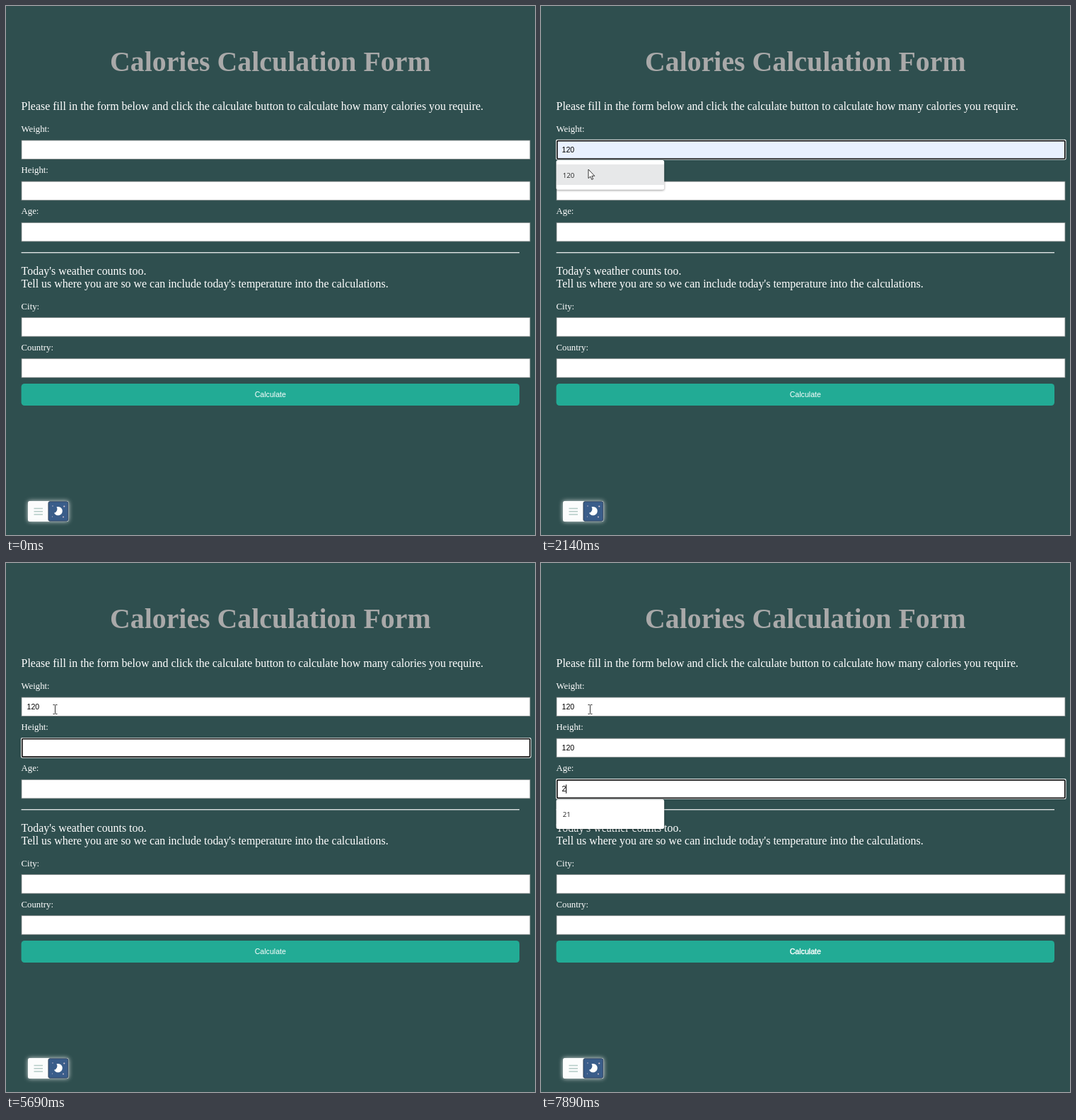
Write an HTML page that moves like this. It is 748 by 748 pixels and loops after 8 s.

```html
<!DOCTYPE html>
<html lang="en">
<head>
<meta charset="utf-8">
<title>Calories Calculation Form</title>
<style>
html, body { margin: 0; width: 100%; height: 100%; overflow: hidden; background: #2f4f4f; }
svg { display: block; width: 748px; height: 748px; }
text { white-space: pre; }
.serif { font-family: "Liberation Serif", "Times New Roman", serif; fill: #fff; }
.sans { font-family: "Liberation Sans", Arial, sans-serif; font-size: 10.62px; }
.h1 { font-size: 39.83px; font-weight: bold; fill: #a9a9a9; }
.p { font-size: 15.93px; }
.label { font-size: 12.75px; }
.menu { font: 9.7px "Open Sans", "Noto Sans", sans-serif; fill: #222; }
#toggle { filter: drop-shadow(0 0 3px #fffc); }
#drop { filter: drop-shadow(0 1px 1.5px #0006); }
</style>
</head>
<body>
<svg viewBox="0 0 748 748">
  <rect width="748" height="748" fill="#2f4f4f"/>
  <text class="serif h1" x="373.8" y="92" text-anchor="middle">Calories Calculation Form</text>
  <text class="serif p" x="21.6" y="147">Please fill in the form below and click the calculate button to calculate how many calories you require.</text>
  <rect x="21.6" y="348" width="704.4" height="1.4" fill="#dde2e2"/>
  <text class="serif p" x="21.6" y="379.5">Today's weather counts too.</text>
  <text class="serif p" x="21.6" y="398">Tell us where you are so we can include today's temperature into the calculations.</text>
  <g id="fields"></g>
  <rect x="21.6" y="534" width="704.4" height="31" rx="4.5" fill="#22ab95"/>
  <text id="button" class="sans" x="373.8" y="553" text-anchor="middle" fill="#fff" stroke="#fff">Calculate</text>

  <g id="toggle">
    <rect x="31" y="700" width="57.5" height="29" rx="2.5" fill="#fbfcfc"/>
    <path d="M39.5 710.5h12.5M39.5 714.7h12.5M39.5 718.9h12.5" stroke="#b3cac5" stroke-width="1.5"/>
    <rect x="60" y="700.8" width="27.8" height="27.4" rx="2" fill="#3a5d8a" stroke="#2b3f55"/>
    <path d="M71.5 708.3A6.2 6.2 0 1 1 68 716.8A5.6 5.6 0 0 0 71.5 708.3Z" fill="#fff"/>
    <g fill="#d9c6d2">
      <circle cx="82.3" cy="707.5" r="1.1"/><circle cx="81" cy="722.5" r=".9"/>
      <circle cx="66" cy="707" r=".7"/><circle cx="65.5" cy="722" r=".6"/>
    </g>
  </g>

  <g id="drop">
    <rect x="21.5" y="218" width="152.7" height="41.8" rx="2.5" fill="#fff"/>
    <rect id="hover" x="22" y="224" width="152" height="29" fill="#e7e8e9"/>
    <text id="option" class="menu" x="30.7" y="242.6"></text>
  </g>

  <g id="cursor">
    <circle id="glow" cx="-1.3" r="12" fill="#fdf573"/>
    <path id="beam" d="M-3-6.5h2.2L0-5.8L.8-6.5H3M0-5.8V5.8M-3 6.5h2.2L0 5.8L.8 6.5H3" fill="none" stroke="#333" stroke-width="1"/>
    <path id="arrow" d="M0 0V12.6L2.9 10L4.8 14.4L6.7 13.6L4.9 9.3H8.8Z" fill="#fff" stroke="#222" stroke-width=".9"/>
  </g>
</svg>
<script>
const LOOP = 8000, PITCH = 58.15;
const $ = id => document.getElementById(id);
const show = (el, on) => el.setAttribute('visibility', on ? 'visible' : 'hidden');

const fields = [['Weight:', 190], ['Height:', 248.1], ['Age:', 306.3], ['City:', 440.6], ['Country:', 498.7]].map(([label, y]) => {
  const g = document.createElementNS('http://www.w3.org/2000/svg', 'g');
  g.innerHTML = `
    <text class="serif label" x="21.6" y="${y - 12}">${label}</text>
    <rect x="22" y="${y}" width="719" height="26.6" fill="#fff" stroke="#777f7f" stroke-width=".8"/>
    <g>
      <rect x="21" y="${y - 1.2}" width="721.6" height="28.8" rx="2" fill="#fff"/>
      <rect x="22.8" y="${y + .6}" width="718" height="25.4" rx="1" fill="#fff" stroke="#101010" stroke-width="1.7"/>
    </g>
    <text class="sans" x="29.5" y="${y + 16.8}" fill="#000"></text>
    <rect y="${y + 7}" width="1" height="12.4" fill="#000"/>`;
  const [, , ring, value, caret] = g.children;
  $('fields').append(g);
  return { ring, value, caret, fill: ring.lastElementChild };
});

// Each step changes part of the form state from its time on.
const steps = [
  [0, { focus: -1, values: ['', '', ''], caret: 0, drop: 0, bold: 0 }],
  [1210, { focus: 0, caret: 1 }],
  [1290, { drop: 1 }],
  [1800, { caret: 0 }],
  [2340, { caret: 1 }],
  [2860, { caret: 0 }],
  [3330, { values: ['1', '', ''], caret: 1 }],
  [3470, { values: ['12', '', ''] }],
  [3740, { values: ['120', '', ''] }],
  [3810, { drop: .6 }],
  [3880, { drop: .25 }],
  [3950, { drop: 0 }],
  [4100, { focus: 1 }],
  [4620, { caret: 0 }],
  [5160, { caret: 1 }],
  [5690, { caret: 0 }],
  [6230, { caret: 1 }],
  [6305, { values: ['120', '1', ''] }],
  [6380, { drop: 1 }],
  [6520, { values: ['120', '12', ''] }],
  [6590, { values: ['120', '120', ''] }],
  [6650, { drop: .5 }],
  [6710, { drop: 0 }],
  [6900, { focus: 2, bold: 1 }],
  [7430, { caret: 0 }],
  [7890, { values: ['120', '120', '2'], caret: 1, drop: 1 }]
];
const options = ['120', '120', '21'];

// start, end, number of held positions, from, to
const moves = [
  [330, 1080, 11, [112, 756], [90, 197]],
  [1800, 2140, 5, [90, 197], [67, 231]],
  [2280, 2340, 2, [67, 231], [69.5, 207]]
];
const smooth = p => p * p * (3 - 2 * p);

function pointer(t) {
  let pos = null;
  for (const [start, end, count, from, to] of moves) {
    if (t < start) break;
    const step = Math.floor((t - start) / (end - start) * (count - 1) + 1e-6) + 1;
    const p = Math.min(1, step / count);
    const k = count > 5 ? smooth(p) : p;
    pos = from.map((v, i) => v + (to[i] - v) * k);
  }
  return pos;
}

function render(t) {
  const s = Object.assign({}, ...steps.filter(([at]) => at <= t).map(([, change]) => change));
  const pos = pointer(t);
  const hovered = s.focus === 0 && s.drop > 0 && pos[1] > 224;

  fields.forEach((f, i) => {
    const focused = i === s.focus;
    const text = focused && hovered ? options[i] : s.values[i] || '';
    show(f.ring, focused);
    f.fill.setAttribute('fill', focused && hovered ? '#e8f0fe' : '#fff');
    f.value.textContent = text;
    f.caret.setAttribute('x', 29.2 + text.length * 5.9);
    show(f.caret, focused && s.caret);
  });

  $('drop').setAttribute('opacity', s.drop);
  $('drop').setAttribute('transform', `translate(0 ${Math.max(0, s.focus) * PITCH})`);
  $('option').textContent = options[s.focus] || '';
  show($('hover'), hovered);
  $('button').setAttribute('stroke-width', s.bold ? .4 : 0);

  show($('cursor'), pos);
  if (pos) {
    const overField = pos[1] < 217 || [261, 319, 454, 512].some(y => Math.abs(pos[1] - y) < 13 && !s.drop);
    $('cursor').setAttribute('transform', `translate(${pos})`);
    $('beam').style.display = overField ? '' : 'none';
    $('arrow').style.display = overField ? 'none' : '';
  }
  $('glow').style.display = t >= 1210 && t < 1340 ? '' : 'none';
}

const origin = performance.now();
function tick() {
  render((performance.now() - origin) % LOOP);
  requestAnimationFrame(tick);
}
tick();
</script>
</body>
</html>
```
